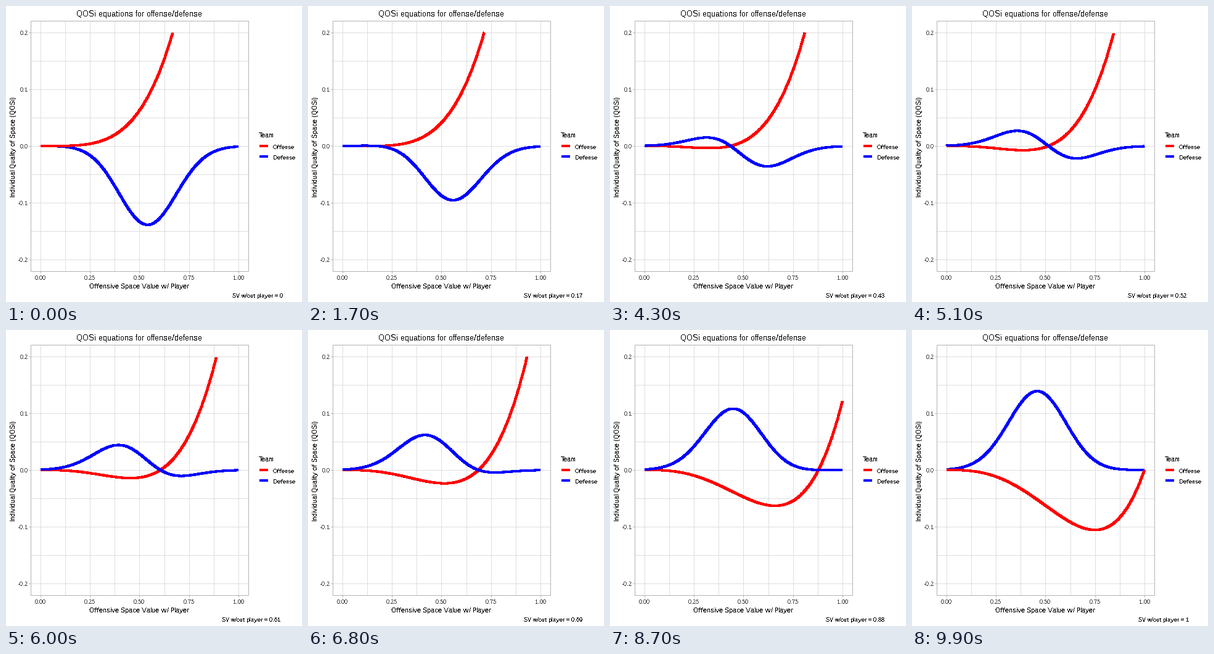
These frames come from a looping animation (480 px wide and 480 px high, 10000 ms). A matplotlib script:

```python
import numpy as np
import matplotlib.pyplot as plt
from matplotlib.animation import FuncAnimation
from matplotlib.patches import Rectangle

SIZE, DPI, FRAMES, INTERVAL = 480, 96, 100, 100
PX = 72 / DPI
RED, BLUE = "#ff0000", "#0000ff"
GRID, BORDER, TICK_TEXT = "#dedede", "#b3b3b3", "#4d4d4d"
LEFT, RIGHT, TOP, BOTTOM = 40, 393, 24, 430

plt.rcParams.update({
    "font.family": "Liberation Sans",
    "text.hinting": "native",
    "text.hinting_factor": 1,
    "text.antialiased": False,
    "path.simplify": False,
    "toolbar": "None",
})

fig = plt.figure(figsize=(SIZE / DPI, SIZE / DPI), dpi=DPI, facecolor="white")
ax = fig.add_axes([0, 0, 1, 1])
ax.set_xlim(0, SIZE)
ax.set_ylim(SIZE, 0)
ax.axis("off")


def to_x(v):
    return np.round(56 + 320.9 * v)


def to_y(v):
    return np.round(227 - 922 * v)


def rule(xs, ys, color):
    # Half-pixel centres keep each rule exactly one pixel wide
    ax.plot(np.add(xs, 0.5), np.add(ys, 0.5), color=color, lw=PX,
            solid_capstyle="butt", zorder=1, snap=False)


def label(x, y, text, size, color="black", **kw):
    return ax.text(x, y, text, fontsize=size * PX, color=color,
                   va="baseline", **kw)


def curve(color):
    return ax.plot([], [], color=color, lw=4 * PX, antialiased=False, snap=False,
                   solid_capstyle="butt", solid_joinstyle="round")[0]


# Panel grid, border, ticks
for v in np.linspace(0, 1, 9):
    rule([to_x(v)] * 2, [TOP, BOTTOM], GRID)
for v in np.linspace(-0.2, 0.2, 9):
    rule([LEFT, RIGHT], [to_y(v)] * 2, GRID)
for v in np.linspace(0, 1, 5):
    rule([to_x(v)] * 2, [BOTTOM, BOTTOM + 3], BORDER)
    label(to_x(v), 444, f"{v:.2f}", 9, TICK_TEXT, ha="center")
for v in (-0.2, -0.1, 0.0, 0.1, 0.2):
    rule([LEFT - 3, LEFT], [to_y(v)] * 2, BORDER)
    label(36, to_y(v) + 4, f"{v:.1f}", 9, TICK_TEXT, ha="right")
ax.add_patch(Rectangle((LEFT + 0.5, TOP + 0.5), RIGHT - LEFT, BOTTOM - TOP,
                       fill=False, ec=BORDER, lw=PX, zorder=5, snap=False))

# Titles
label(216, 17, "QOSi equations for offense/defense", 13, ha="center")
label(216, 458, "Offensive Space Value w/ Player", 11, ha="center")
label(15, 228, "Individual Quality of Space (QOSi)", 11, ha="center",
      rotation=90, rotation_mode="anchor")

# Legend
label(410, 213, "Team", 11)
for y, name, color in ((227, "Offense", RED), (244, "Defense", BLUE)):
    ax.add_patch(Rectangle((411, y - 2), 14, 4, color=color, lw=0,
                           antialiased=False))
    label(433, y + 5, name, 9)

caption = label(366, 473, "", 9)
offense, defense = curve(RED), curve(BLUE)

x = np.linspace(0, 1, 1001)
bell = np.exp(-((x - 0.5) / 0.15) ** 2 / 2) / (0.15 * np.sqrt(2 * np.pi)) / 10


def set_curve(line, y):
    # Whole-pixel vertices give the stepped, unsmoothed stroke
    ok = np.abs(y) <= 0.2
    line.set_data(to_x(x[ok]), to_y(y[ok]))


def update(i):
    sv = i / (FRAMES - 1)
    set_curve(offense, x ** 3 * (x - sv))
    set_curve(defense, bell * (sv - x))
    offense.set_zorder(4 if i in (0, FRAMES - 1) else 2)
    defense.set_zorder(3)
    value = f"{round(sv, 2):g}"
    width = 82 + {1: 0, 3: 8, 4: 13}[len(value)]
    caption.set_text(f"SV w/out player = {value}")
    caption.set_x(round(475 - 1.315 * width))
    return offense, defense, caption


anim = FuncAnimation(fig, update, frames=FRAMES, interval=INTERVAL,
                     repeat=True, repeat_delay=0, blit=False)
plt.show()
```
